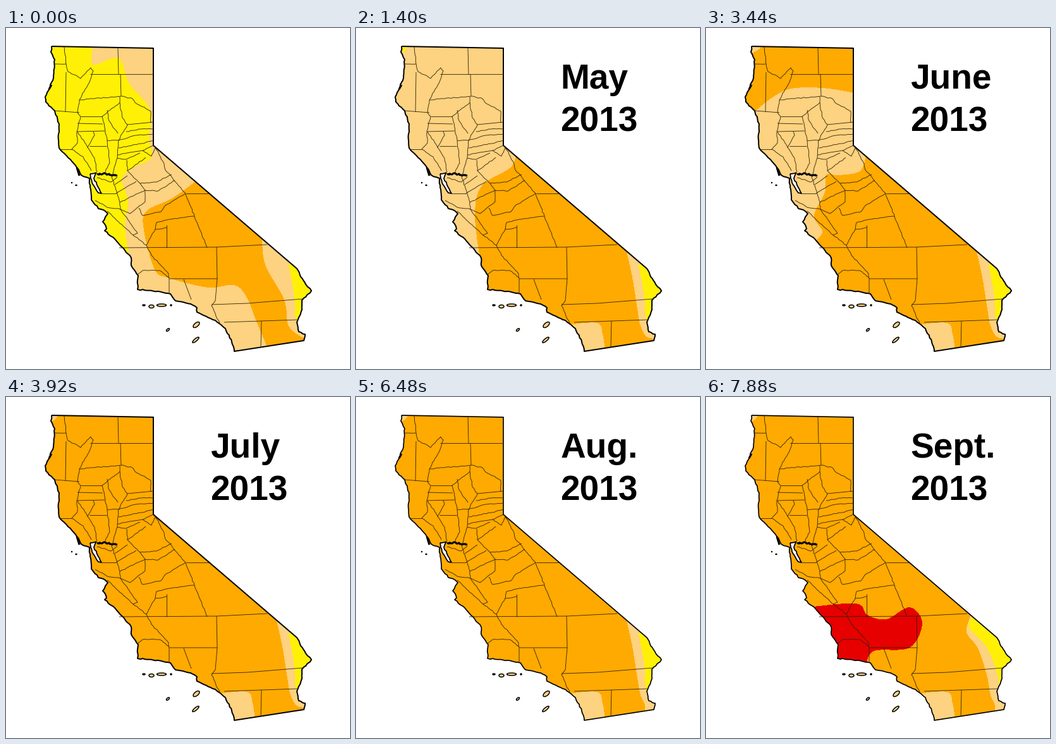
These frames come from a looping animation (544 by 540 pixels, 8 s). A matplotlib script:

```python
import numpy as np
import matplotlib.pyplot as plt
from matplotlib.animation import FuncAnimation
from matplotlib.collections import EllipseCollection, LineCollection
from matplotlib.patches import PathPatch
from matplotlib.path import Path

W, H, DPI = 544, 540, 100
PX = 72 / DPI
TICK, LOOP, FADE = 40, 8000, 400
YELLOW, TAN, ORANGE, RED = (255, 240, 5), (253, 210, 128), (255, 170, 0), (230, 0, 0)
rng = np.random.default_rng(4)


def rough(pts, amp=0.7, step=4):
    """Subdivide a polyline and shake the new points a little."""
    out = [pts[0]]
    for a, b in zip(pts[:-1], pts[1:]):
        a, b = np.array(a, float), np.array(b, float)
        n = max(1, round(np.hypot(*(b - a)) / step))
        for i in range(1, n + 1):
            shake = rng.uniform(-amp, amp, 2) if i < n else 0
            out.append(a + (b - a) * i / n + shake)
    return np.array(out)


def spline(pts, n=8):
    """Smooth open curve through the points."""
    p = np.array([pts[0], *pts, pts[-1]], float)
    t = np.linspace(0, 1, n, endpoint=False)[:, None]
    parts = [b + t * ((c - a) + t * ((2 * a - 5 * b + 4 * c - d)
                                     + t * (3 * b - a - 3 * c + d))) / 2
             for a, b, c, d in zip(p, p[1:], p[2:], p[3:])]
    return np.vstack(parts + [p[-1:]])


# State outline, clockwise from the north-west corner
border = [(72, 29), (233, 32), (233, 186), (460, 381)]
river = [(460, 381), (466, 394), (474, 406), (483, 416), (468, 431), (468, 446),
         (460, 466), (463, 481), (473, 485), (471, 495)]
south_coast = [
    (361, 512), (357, 497), (347, 476), (331, 463), (302, 450), (302, 443),
    (292, 437), (268, 432), (260, 421), (240, 417), (208, 414), (209, 392),
    (198, 376), (198, 364), (172, 334), (156, 321), (159, 318), (153, 307),
    (161, 294), (157, 290), (146, 286)]
north_coast = [
    (146, 286), (135, 272), (133, 252), (132, 238), (119, 233), (116, 227),
    (112, 221), (104, 211), (84, 190), (83, 168), (84, 152), (77, 131),
    (63, 117), (62, 109), (74, 83), (77, 50), (71, 38), (72, 29)]
outline = np.vstack([border, rough(river), rough(south_coast, .9),
                     rough(north_coast, .9)])

bay = [(133, 231), (143, 229), (139, 238), (151, 262), (146, 261), (136, 245),
       (133, 231)]
delta = [(144, 231), (158, 231), (176, 234)]
# x, y, width, height
islands = np.array([(218, 439, 4, 2), (230, 441, 8, 5), (246, 439, 15, 4),
                    (261, 439, 2, 2), (256, 478, 6, 3), (301, 470, 12, 6),
                    (300, 494, 13, 4), (104, 245, 1, 1), (111, 249, 2, 1)])
tilt = np.where(islands[:, 1] > 460, 40, 0)

# Surveyed county lines stay straight, the others follow rivers and ridges
straight = [
    [(177, 31), (178, 73)], [(133, 73), (233, 73)], [(181, 73), (182, 108)],
    [(95, 70), (94, 133)], [(77, 131), (116, 134)], [(118, 140), (152, 140)],
    [(113, 151), (153, 152)], [(113, 164), (156, 163)], [(192, 153), (233, 149)],
    [(85, 192), (104, 192)], [(132, 187), (159, 187)], [(285, 262), (321, 262)],
    [(179, 348), (333, 347), (413, 343)],
    [(333, 347), (334, 397), (258, 397), (258, 421)], [(254, 312), (254, 348)],
    [(281, 398), (293, 430)], [(334, 397), (331, 432)],
    [(325, 438), (382, 436), (469, 429)], [(345, 466), (462, 462)],
    [(404, 464), (403, 506)], [(150, 262), (174, 262)]]
northern = [
    [(92, 30), (95, 57), (77, 57)],
    [(95, 57), (98, 69), (118, 80), (134, 63), (138, 68), (133, 83), (116, 114)],
    [(116, 114), (182, 108), (200, 112), (204, 118), (229, 132), (229, 150)],
    [(116, 114), (113, 134), (118, 140), (112, 164)],
    [(180, 109), (180, 118), (152, 140), (160, 178), (164, 214), (157, 228)],
    [(180, 118), (184, 142), (192, 153), (178, 178)],
    [(160, 130), (163, 147), (177, 167)],
    [(112, 164), (113, 182), (104, 192), (122, 204), (135, 226)],
    [(113, 164), (129, 189), (140, 206), (144, 228)],
    [(129, 189), (140, 170), (138, 164)]]
sierra = [
    [(190, 164), (214, 160), (233, 160)], [(178, 178), (205, 170), (233, 168)],
    [(160, 178), (178, 178), (176, 206), (167, 236)],
    [(178, 190), (214, 183), (233, 178)], [(176, 201), (216, 194), (233, 186)],
    [(216, 194), (230, 203), (236, 190)], [(176, 206), (190, 208), (212, 198)],
    [(191, 209), (192, 226), (221, 205)],
    [(236, 189), (250, 215), (252, 225), (284, 262), (298, 298), (318, 348)],
    [(192, 226), (212, 246), (238, 244), (262, 232)],
    [(212, 246), (220, 257), (241, 258), (267, 241)]]
central = [
    [(144, 237), (166, 244), (176, 236)],
    [(167, 236), (180, 276), (181, 287), (160, 284), (141, 273)],
    [(172, 248), (192, 234)], [(174, 262), (206, 243)],
    [(180, 276), (220, 257), (220, 275), (196, 294), (181, 287)],
    [(210, 285), (216, 297), (245, 291), (252, 281), (284, 262)],
    [(160, 290), (201, 328), (208, 325), (181, 287)],
    [(201, 328), (222, 344), (230, 360), (257, 389), (258, 397)],
    [(222, 344), (236, 319), (254, 316)],
    [(236, 319), (238, 308), (258, 303), (298, 298)],
    [(207, 391), (216, 384), (243, 384), (258, 395)],
    [(331, 432), (325, 440), (338, 467)]]


def west(pts):
    """Everything left of a curve that runs from north to south."""
    return np.vstack([spline(pts), [(0, pts[-1][1]), (0, 0), (pts[0][0], 0)]])


def east(pts):
    return np.vstack([spline(pts), [(W, 500), (W, 330)]])


def below(pts):
    """Area between a curve and the corner under its first point."""
    return np.vstack([spline(pts), [(pts[0][0], pts[-1][1])]])


west_a = west([(301, 242), (262, 270), (222, 290), (218, 320), (235, 382),
               (258, 396), (320, 411), (360, 407), (380, 425), (395, 462),
               (415, 510)])
yellow_a = west([(137, 30), (138, 58), (178, 48), (195, 88), (228, 130), (226, 175),
                 (230, 205), (200, 222), (184, 240), (193, 275), (188, 315),
                 (196, 366)])
west_b = west([(253, 203), (243, 222), (199, 250), (188, 295), (196, 366)])
west_c = west([(253, 203), (243, 227), (210, 233), (190, 233), (188, 260),
               (171, 297), (184, 322), (174, 337)])
south_b = below([(243, 420), (245, 404), (284, 405), (350, 420), (375, 447),
                 (400, 510)])
san_diego = below([(335, 470), (381, 467), (390, 485), (394, 512)])
red = below([(160, 333), (237, 327), (255, 345), (285, 352), (322, 333), (342, 358),
             (322, 397), (266, 402), (253, 424)])
edge = [(427, 350), (437, 395), (445, 445), (450, 472)]
tail = [(450, 472), (457, 489), (454, 505)]
strip_a = east([(405, 330), (410, 375), (440, 430), (447, 472), (472, 492)])
strip_b = east(edge + [(460, 489), (476, 492)])
strip_c = east(edge[:-1] + tail)
strip_d = east([(420, 342), (412, 372), (430, 398), (444, 440)] + tail)
yellow_b = east([(447, 375), (456, 425), (458, 460), (464, 480)])
yellow_d = east([(424, 345), (416, 364), (445, 398), (461, 440), (464, 462)])
north = west([(236, 103), (185, 95), (135, 96), (105, 110), (75, 134)])
corner = west([(83, 28), (77, 36), (68, 40)])
wide_corner = west([(90, 28), (80, 36), (68, 41)])

ys, xs = np.mgrid[0:H, 0:W]
grid = np.column_stack([xs.ravel(), ys.ravel()]) + .5


def paint(*zones):
    """Colour raster of one map: orange ground with zones laid over it."""
    img = np.full((H, W, 3), ORANGE, float)
    for color, pts in zones:
        img[Path(pts).contains_points(grid).reshape(H, W)] = color
    return img


east_b = [(TAN, strip_b), (YELLOW, yellow_b)]
east_c = [(TAN, strip_c), (YELLOW, yellow_b)]
late = [(TAN, san_diego), (TAN, corner)]
april = paint((TAN, west_a), (YELLOW, yellow_a), (TAN, strip_a), (YELLOW, yellow_b))
may = paint((TAN, west_b), (TAN, south_b), (YELLOW, corner), *east_b)
late_may = paint((TAN, west_b), (TAN, san_diego), (YELLOW, corner), *east_b)
june = paint((TAN, west_c), (TAN, san_diego), (YELLOW, corner), *east_b)
late_june = paint((TAN, west_c), (ORANGE, north), (TAN, san_diego),
                  (TAN, wide_corner), *east_b)
july = paint(*late, *east_b)
august = paint(*late, *east_c)
late_august = paint(*late, *east_c, (RED, red))
september = paint(*late, (TAN, strip_d), (YELLOW, yellow_d), (RED, red))

# start in ms, map, month
EVENTS = [(-FADE, april, ""), (40, may, "May"), (880, late_may, "May"),
          (1840, june, "June"), (2520, late_june, "June"), (3480, july, "July"),
          (5520, august, "Aug."), (6520, late_august, "Aug."),
          (7200, september, "Sept.")]
THIN_FROM = 4600

fig = plt.figure(figsize=(W / DPI, H / DPI), dpi=DPI, facecolor="white")
ax = fig.add_axes([0, 0, 1, 1])
picture = ax.imshow(april.astype(np.uint8), extent=(0, W, H, 0),
                    interpolation="nearest", aspect="auto")
ax.set(xlim=(0, W), ylim=(H, 0))
ax.axis("off")

shape = Path(outline)
picture.set_clip_path(shape, ax.transData)


def ink(lines, width, color="black"):
    ax.add_collection(LineCollection(lines, colors=color, linewidths=width * PX))


ink(straight + [rough(p) for p in northern + sierra + central], .85, "#2e2208")
ax.add_collection(EllipseCollection(
    islands[:, 2], islands[:, 3], -tilt, units="xy", offsets=islands[:, :2],
    offset_transform=ax.transData, facecolors=[np.array(TAN) / 255],
    edgecolors="black", linewidths=1.5 * PX))
ax.add_patch(PathPatch(Path(rough(bay)), fc="white", ec="black", lw=1.8 * PX))
ink([rough(delta, 1.2, 2), [(112, 221), (116, 234)], [(68, 97), (72, 90)]], 3)
coast = ax.add_patch(PathPatch(shape, fill=False, ec="black", lw=2 * PX,
                               joinstyle="round"))
ax.plot([W - .5] * 2, [0, H], color="#d0d0d0", lw=PX)


def label(y):
    return ax.text(323.5, y, "", family="Liberation Sans", weight="bold",
                   size=55 * PX, color="black", va="baseline")


old_month, new_month, year = label(96), label(96), label(163)
year.set_text("2013")


def draw(i):
    t = i * TICK
    n = max(j for j, e in enumerate(EVENTS) if e[0] <= t)
    start, img, month = EVENTS[n]
    _, prev_img, prev_month = EVENTS[max(n - 1, 0)]
    k = min(1, (t - start + TICK) / FADE)
    picture.set_data(np.round(prev_img + (img - prev_img) * k).astype(np.uint8))
    same = month == prev_month
    old_month.set_text("" if same else prev_month)
    old_month.set_alpha(1 - k)
    new_month.set_text(month)
    new_month.set_alpha(1 if same else k)
    year.set_alpha(0 if not month else 1 if prev_month else k)
    coast.set_linewidth((1.7 if t >= THIN_FROM else 2) * PX)
    return picture, old_month, new_month, year, coast


anim = FuncAnimation(fig, draw, frames=LOOP // TICK, interval=TICK,
                     repeat=True, repeat_delay=0, blit=False)
plt.show()
```
